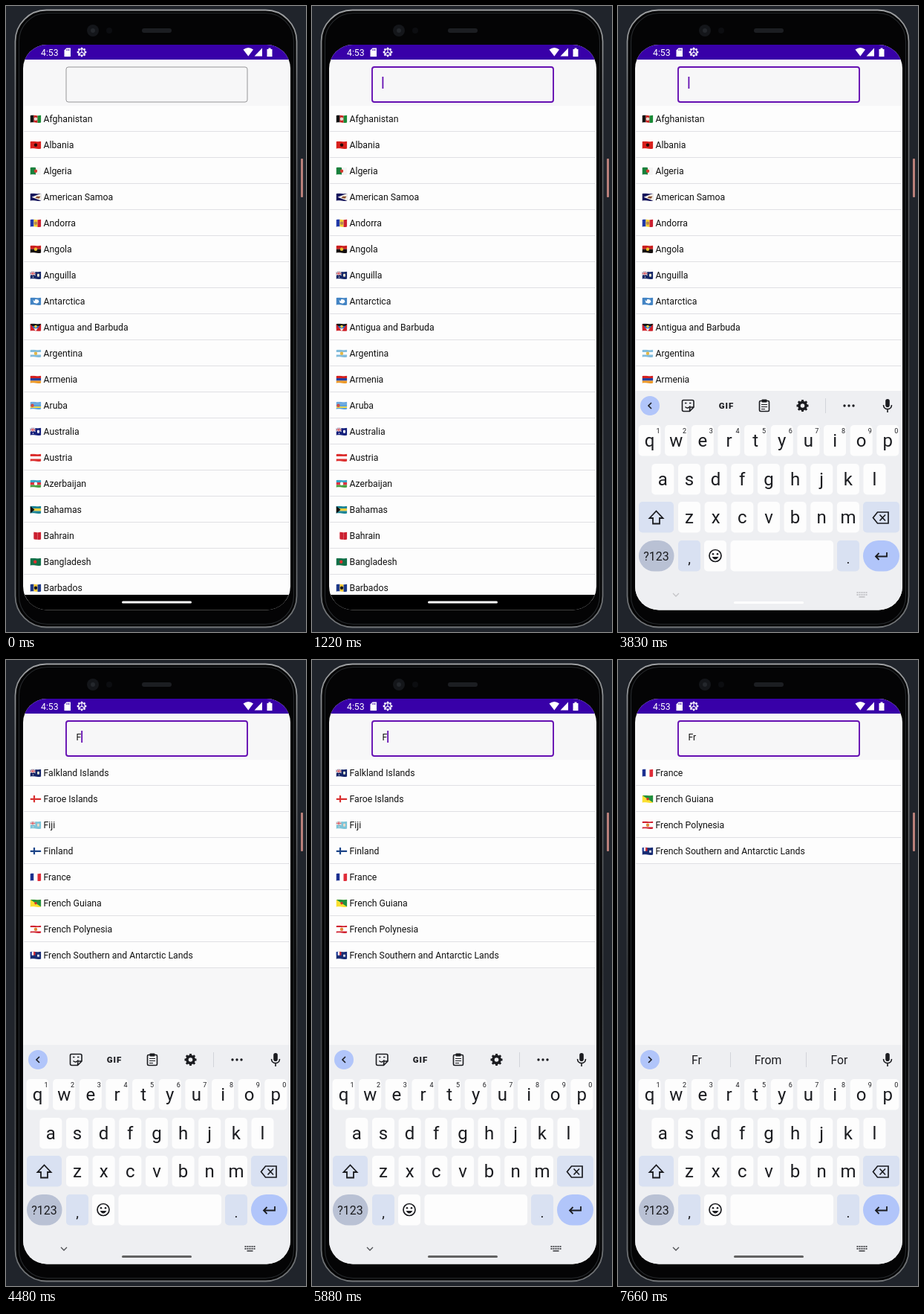
Write an HTML page with a canvas that moves like this. It is 404 px wide and 841 px high and loops after 8000 ms.

```html
<!DOCTYPE html>
<html lang="en">
<head>
<meta charset="utf-8">
<title>Country search</title>
<style>
html, body { margin: 0; width: 100%; height: 100%; overflow: hidden; background: #20242b; }
canvas { display: block; }
</style>
</head>
<body>
<canvas id="stage" width="404" height="841"></canvas>
<script>
const c = document.getElementById('stage').getContext('2d');
const LOOP = 8000;
const PAGE = '#f7f7f8', ROW = '#fdfdfd', BOARD = '#eeeff2', INK = '#1b1c20';
const SOFT = '#d9e1f2', BLUE = '#b1c5fa', PURPLE = '#650fb2';
const FONT = 'Roboto, "Noto Sans", sans-serif';

// name | stripe direction + colours | emblem: kind, colour, x
const ALL = [
  'Afghanistan|v #111 #c8201e #1a8a36|dot #e8d8d0 .5',
  'Albania|h #d8201c|dot #2a0808 .5',
  'Algeria|v #18803c #f4f4f4|dot #d43a30 .5',
  'American Samoa|h #14145c|wing',
  'Andorra|v #2038a8 #f4d030 #cc2030|dot #b88850 .5',
  'Angola|h #cc2020 #151010|dot #e8c030 .5',
  'Anguilla|h #162868|jack #f0e8d0',
  'Antarctica|h #4384c4|blob #fff .5',
  'Antigua and Barbuda|h #151515 #2e6cc0 #f4f4f4|vee',
  'Argentina|h #82bcdc #fff #82bcdc|dot #e4b848 .5',
  'Armenia|h #d42020 #2440a0 #ee9a28|',
  'Aruba|h #5aa0dc #5aa0dc #5aa0dc #e8d850 #5aa0dc|dot #d05048 .2',
  'Australia|h #14207c|jack #fff',
  'Austria|h #dc3030 #fff #dc3030|',
  'Azerbaijan|h #38a4c8 #dc3040 #48a040|dot #fff .5',
  'Bahamas|h #1c8494 #f0d040 #1c8494|tri #111',
  'Bahrain|v #fff #cc2030 #cc2030|zig',
  'Bangladesh|h #127048|dot #e03030 .45',
  'Barbados|v #1c3888 #f4c830 #1c3888|dot #181818 .5'
];
const F_ROWS = [
  'Falkland Islands|h #142468|jack #d8e0d0',
  'Faroe Islands|h #fff|cross #d83030',
  'Fiji|h #7cc4d8|jack #e8d8c8',
  'Finland|h #fff|cross #1c4488',
  'France|v #1c3090 #fff #e02c38|',
  'French Guiana|h #fae030|diag',
  'French Polynesia|h #d02030 #fff #fff #d02030|dot #e08838 .5',
  'French Southern and Antarctic Lands|h #182c74|canton'
];

const ease = (t, a, b) => {
  const p = Math.min(1, Math.max(0, (t - a) / (b - a)));
  return p * p * (3 - 2 * p);
};
const mix = (a, b, p) => a + (b - a) * p;
function box(x, y, w, h, fill, r = 0) {
  c.beginPath();
  c.roundRect(x, y, w, h, r);
  c.fillStyle = fill;
  c.fill();
}
function frame(x, y, w, h, r, color, width) {
  c.beginPath();
  c.roundRect(x, y, w, h, r);
  c.strokeStyle = color;
  c.lineWidth = width;
  c.stroke();
}
function dot(x, y, r, fill) {
  c.beginPath();
  c.arc(x, y, r, 0, 7);
  c.fillStyle = fill;
  c.fill();
}
function ring(x, y, r, color, width) {
  c.beginPath();
  c.arc(x, y, r, 0, 7);
  c.strokeStyle = color;
  c.lineWidth = width;
  c.stroke();
}
function path(d, fill) {
  c.fillStyle = fill;
  c.fill(new Path2D(d));
}
function line(d, color = INK, width = 1.6) {
  c.strokeStyle = color;
  c.lineWidth = width;
  c.stroke(new Path2D(d));
}
function text(s, x, y, size, fill = INK, align = 'left', weight = 400) {
  c.font = `${weight} ${size}px ${FONT}`;
  c.textAlign = align;
  c.fillStyle = fill;
  c.fillText(s, x, y);
}
function at(x, y, draw) {
  c.save();
  c.translate(x, y);
  draw();
  c.restore();
}
function gear(x, y, r, color, rim) {
  at(x, y, () => {
    for (let i = 0; i < 8; i++) {
      c.rotate(Math.PI / 4);
      box(-r * .18, -r, r * .36, r * .4, color);
    }
  });
  ring(x, y, r * .8 - rim / 2, color, rim);
}

const emblems = {
  dot: (color, x) => dot(x * 15, 5, 2.2, color),
  blob: color => path('M4 3 6 5 7 2 11 3 12 6 9 8 5 7Z', color),
  wing: () => {
    path('M15 0V10L2 5Z', '#f4f0e8');
    path('M14 4 9 4 7 6 12 7Z', '#885030');
  },
  jack: color => {
    line('M0 0 7 5M7 0 0 5', '#e8e0dc', 1.2);
    line('M3.5 0V5M0 2.5H7', '#fff', 1.8);
    line('M3.5 0V5M0 2.5H7', '#d03038', .9);
    box(9.5, 3, 3, 4, color, 1);
    dot(4, 7.5, .8, color);
  },
  vee: () => {
    path('M0 0V10H7.5ZM15 0V10H7.5Z', '#d02028');
    dot(7.5, 3.8, 1.8, '#f0d040');
  },
  tri: color => path('M0 0 6 5 0 10Z', color),
  zig: () => path('M4 0 7 1 4 2 7 3 4 4 7 5 4 6 7 7 4 8 7 9 4 10H8V0Z', '#cc2030'),
  cross: color => line('M5.5 0V10M0 5H15', color, 2.2),
  diag: () => {
    path('M0 0H15V10Z', '#209040');
    dot(7.5, 5, 1.7, '#d83028');
  },
  canton: () => {
    box(0, 0, 2.3, 5, '#2040a0');
    box(2.3, 0, 2.3, 5, '#fff');
    box(4.6, 0, 2.3, 5, '#d83038');
    box(9.5, 4, 3, 3, '#d8dce8');
  }
};

function flag(y, stripes, emblem) {
  const [dir, ...colors] = stripes.split(' ');
  const n = colors.length;
  at(32.5, y, () => {
    c.beginPath();
    c.moveTo(0, .4);
    c.bezierCurveTo(5, -1.2, 9, 1.5, 14.7, 0);
    c.lineTo(14.7, 9.6);
    c.bezierCurveTo(9, 11.2, 5, 8.5, 0, 10);
    c.clip();
    colors.forEach((color, i) => dir === 'v'
      ? box(i * 15 / n, -1, 15 / n, 12, color)
      : box(0, -.4 + i * 10.8 / n, 15, 10.8 / n, color));
    const [kind, ...args] = emblem.split(' ');
    if (kind) emblems[kind](...args);
  });
}

function list(rows) {
  rows.forEach((row, i) => {
    const [name, stripes, emblem] = row.split('|');
    const y = 134 + i * 35;
    box(24, y, 358, 34, ROW);
    box(24, y + 34, 358, 1, '#e0e0e4');
    flag(y + 12.8, stripes, emblem);
    text(name, 50.5, y + 22, 12.25, '#111');
  });
}

function phone() {
  box(0, 0, 404, 841, '#20242b');
  const metal = c.createLinearGradient(0, 0, 0, 841);
  [[0, '#a0a2a4'], [.12, '#74777a'], [.5, '#3a3d40'], [.8, '#54575a'], [1, '#74777a']]
    .forEach(([p, color]) => metal.addColorStop(p, color));
  box(12, 5, 380, 830, '#040405', 42);
  frame(12.5, 5.5, 379, 829, 42, metal, 1.8);
  frame(17.5, 9.5, 370, 821, 38, '#25282b', 1.2);
  box(397, 205, 3, 52, '#ba807a', 1);
  dot(117, 33, 8, '#14161a');
  dot(117, 33, 3, '#24272c');
  dot(139, 33, 4, '#0c0d10');
  box(183, 30, 40, 6, '#1c1e22', 3);
}

function statusBar() {
  box(23, 52, 360, 20, '#3800a8');
  text('4:53', 47, 66.5, 12.25, '#fff');
  path('M81.5 56.5H87V68H78.5V59.5Z', '#fff');
  for (let i = 0; i < 3; i++) box(81.3 + i * 1.7, 58, .8, 2, '#3800a8');
  gear(102, 62, 6.3, '#fff', 1.3);
  line('M102 62V57.5M102 62 98 64.5M102 62 106 64.5', '#fff', 1.1);
  path('M319.5 58.5Q326.5 53.5 333 58.5L326.3 67.5Z', '#fff');
  path('M345 56.5V67.5H334.5Z', '#fff');
  path('M353.5 56.5H356.5V58H358.5V68H351.5V58H353.5Z', '#fff');
}

function field(t, typed, caretAfter, cursor) {
  const p = ease(t, 890, 1090);
  const tone = [[150, 101], [150, 15], [152, 178]].map(([a, b]) => Math.round(mix(a, b, p)));
  frame(81, 82, 244, 47, 3, `rgb(${tone})`, mix(1, 1.9, p));
  text(typed, 94.5, 108, 12.25, '#111');
  if (cursor) box(94.5 + c.measureText(caretAfter).width, 95, 1.8, 16, PURPLE);
}

function toolbar() {
  line('M45 533 41 537 45 541');
  // sticker
  line('M88 529.5H100Q102 529.5 102 531.5V539L96.5 544.5H88.5Q86.5 544.5 86.5 542.5V531.5Q86.5 529.5 88 529.5M102 539H98Q96.5 539 96.5 544.5');
  line('M90.5 538.5Q94 542 97.5 537.5M90 533.5H92.5M96 533.5H98.5', INK, 1.4);
  c.letterSpacing = '1px';
  text('GIF', 146, 541, 11.5, INK, 'center', 900);
  c.letterSpacing = '0px';
  // clipboard
  frame(190.5, 530.5, 13, 14, 1.5, INK, 1.6);
  box(193.5, 528.5, 7, 4, INK, 1);
  line('M193 535.5H201M193 538.5H201M193 541.5H198', INK, 1.2);
  gear(248.5, 537, 8, INK, 3.6);
  box(279, 527, 1, 20, '#d2d4da');
  for (const x of [305, 311, 317]) dot(x, 537, 1.7, INK);
}

function suggestions() {
  line('M41 533 45 537 41 541');
  ['Fr', 'From', 'For'].forEach((word, i) =>
    text(word, 106 + i * 96, 543, 15.75, INK, 'center'));
  for (const x of [151, 253]) box(x, 527, 1, 20, '#d2d4da');
}

function key(x, y, label) {
  box(x - 15, y, 30, 41.5, ROW, 5);
  text(label, x, y + 28.5, 24, INK, 'center');
}

function keyboard(t, hints) {
  box(23, 517, 360, 295, BOARD);
  dot(43, 537, 13, BLUE);
  if (hints) suggestions(); else toolbar();
  // microphone
  box(360.2, 528, 5.6, 11, INK, 3);
  line('M357.5 536C357.5 543.5 368.5 543.5 368.5 536M363 541.5V546');

  [...'qwertyuiop'].forEach((k, i) => {
    const x = 42.5 + i * 35.65;
    key(x, 563, k);
    text((i + 1) % 10, x + 11.5, 573.5, 9, INK, 'center');
  });
  [...'asdfghjkl'].forEach((k, i) => key(60.3 + i * 35.65, 615, k));
  [...'zxcvbnm'].forEach((k, i) => key(96 + i * 35.65, 666, k));

  box(28, 666, 47, 41.5, SOFT, 5);
  line('M51.5 678.5 60.5 688H56V695.5H47V688H42.5Z', INK, 1.8);
  box(330, 666, 49, 41.5, SOFT, 5);
  line('M349.5 680H364V695H349.5L343.5 687.5ZM352.5 683.5 360 691.5M360 683.5 352.5 691.5', INK, 1.7);

  box(28, 718, 47.5, 41.5, '#b9c1d4', 21);
  text('?123', 51.5, 745, 16, INK, 'center');
  box(81, 718, 30, 41.5, SOFT, 5);
  text(',', 96, 748.5, 19, INK, 'center');
  box(116, 718, 30, 41.5, ROW, 5);
  ring(131, 738.5, 8, INK, 1.7);
  dot(128, 736.3, 1.3, INK);
  dot(134, 736.3, 1.3, INK);
  path('M126.5 740H135.5Q131 747 126.5 740Z', INK);
  box(151.5, 718, 138.5, 41.5, ROW, 5);
  box(295, 718, 30, 41.5, SOFT, 5);
  text('.', 310, 748.5, 19, INK, 'center');
  box(330, 718, 49, 41.5, BLUE, 21);
  line('M362 734V739.5H347M351.5 735 347 739.5 351.5 744', INK, 1.8);

  const nav = ease(t, 4010, 4400);
  c.globalAlpha = mix(.2, .75, nav);
  line('M74 789 78 793 82 789', INK, 1.3);
  for (let i = 0; i < 10; i++) box(321.5 + i % 5 * 3, 787 + (i > 4) * 3, 2, 2, INK);
  box(324.5, 793, 8, 1.7, INK);
  c.globalAlpha = 1;
  const g = mix(255, 98, nav);
  box(156, 800, 94, 3, `rgb(${g},${g},${g})`, 1.5);
}

const typedAt = t => t < 4200 ? '' : t < 6090 ? 'F' : 'Fr';

// each entry flips the caret
const FLIPS = [930, 1430, 1980, 2430, 2950, 4510, 5000, 5500, 5880, 6700, 7230, 7660];

function draw(t) {
  const typed = typedAt(t);
  const rows = [ALL, F_ROWS, F_ROWS.slice(4)][typed.length];
  const cursor = FLIPS.filter(f => t >= f).length % 2 === 1;

  phone();
  c.save();
  c.beginPath();
  c.roundRect(23, 52, 360, 759.5, 32);
  c.clip();
  box(23, 52, 360, 760, PAGE);
  list(rows);
  statusBar();
  // the caret trails the typed text
  field(t, typed, typedAt(t - 140), cursor);
  if (t >= 3830) keyboard(t, t >= 6490);
  else {
    box(23, 791, 360, 21, '#000');
    box(156, 799.5, 94, 3, '#f8f8f8', 1.5);
  }
  c.restore();
}

const start = performance.now();
function tick() {
  draw((performance.now() - start) % LOOP);
  requestAnimationFrame(tick);
}
tick();
</script>
</body>
</html>
```
